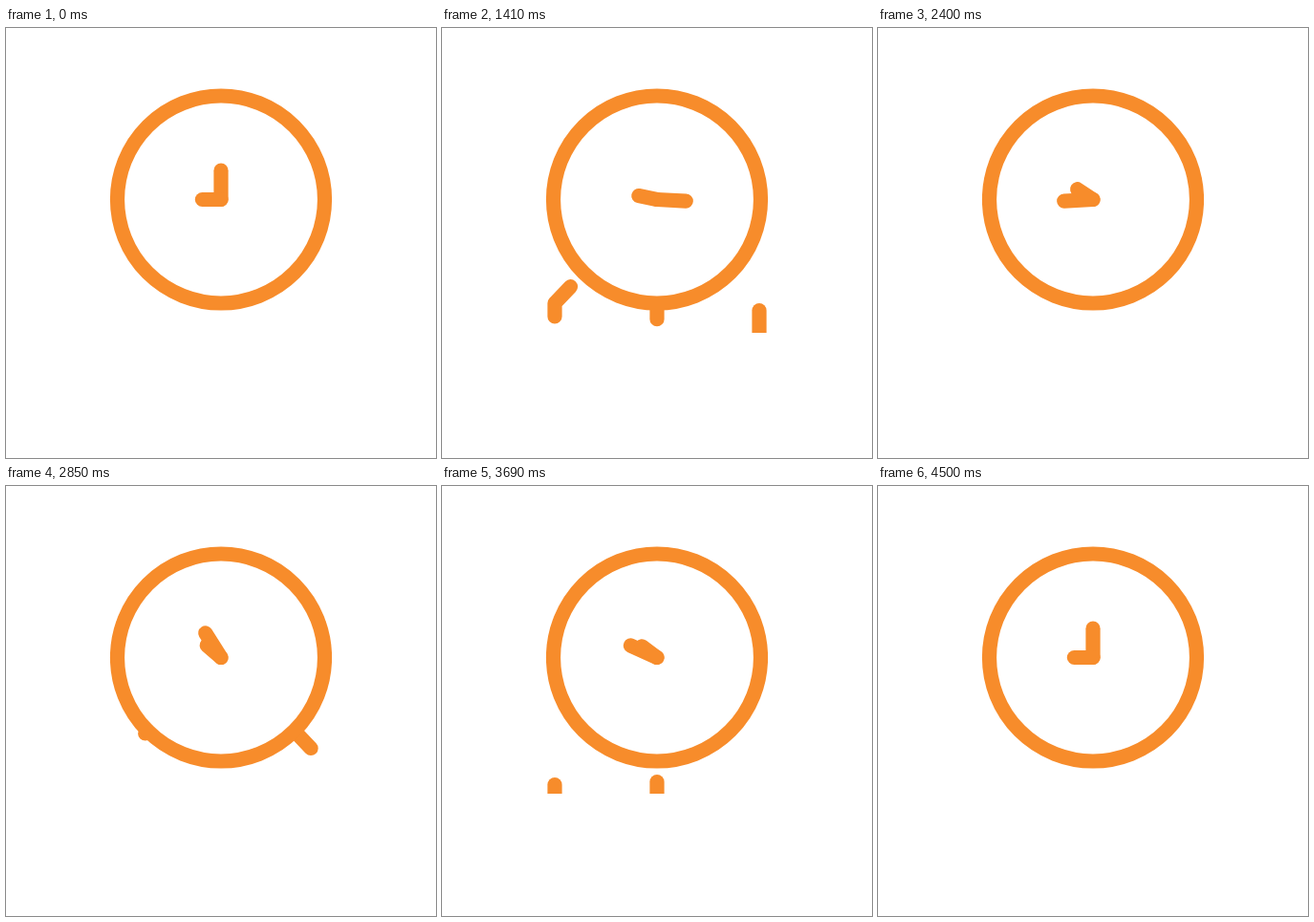
These frames come from a looping animation (450 px wide and 450 px high, 5400 ms). An HTML page:

```html
<!DOCTYPE html>
<html lang="en">
<head>
<meta charset="utf-8">
<title>Clock</title>
<style>
  html, body { margin: 0; width: 100%; height: 100%; overflow: hidden; background: #fff; }
  svg { display: block; width: 100%; height: 100%; }
</style>
</head>
<body>
<svg viewBox="0 0 450 450" fill="none" stroke="#f78c2b" stroke-width="15.2" stroke-linecap="round" stroke-linejoin="round">
  <defs>
    <clipPath id="low"><rect width="450" height="322"/></clipPath>
    <clipPath id="high"><rect width="450" height="319"/></clipPath>
  </defs>
  <g clip-path="url(#high)"><path id="right" d="M301.7 256.2 L332 288 V370"/></g>
  <g clip-path="url(#low)">
    <path id="left" d="M148.3 256.2 L118 288 V370"/>
    <path id="middle" d="M225 290.5 V370"/>
  </g>
  <circle cx="225" cy="179.5" r="108.5"/>
  <path id="minute" d="M225 179.5 V149.2"/>
  <path id="hour" d="M225 179.5 H205.4"/>
</svg>
<script>
  const LOOP = 5400, STEP = 30;
  const REST_FROM = 360, REST_AT = 4500;
  const WAVE = 1920, TRAVEL = 1208, TAIL_LAG = 285;

  const byId = id => document.getElementById(id);
  const minute = byId('minute'), hour = byId('hour');
  const streaks = [
    { path: byId('right'), start: 546, reach: 110 },
    { path: byId('left'), start: 786, reach: 110 },
    { path: byId('middle'), start: 1000, reach: 55 }
  ];

  // Sine ease-in-out between two moments, held at 0 and 1 outside them.
  function ease(time, from, to) {
    const u = Math.min(1, Math.max(0, (time - from) / (to - from)));
    return (1 - Math.cos(Math.PI * u)) / 2;
  }

  function drawStreak({ path, start, reach }, time) {
    const begin = time < start + WAVE ? start : start + WAVE;
    const along = t => reach * ease(t, begin, begin + TRAVEL);
    const head = along(time), tail = along(time - TAIL_LAG);
    const length = head - tail;
    path.style.display = length > 0.01 ? '' : 'none';
    path.setAttribute('stroke-dasharray', `${length} 999`);
    path.setAttribute('stroke-dashoffset', -tail);
  }

  // The hands wind forward slowly, then run back faster.
  function handTurn(time) {
    if (time >= REST_AT) return 0;
    return Math.min(ease(time, REST_FROM, 3450), 1 - ease(time, 3366, 4520));
  }

  function render(now) {
    const time = Math.floor((now % LOOP) / STEP) * STEP;
    const turn = handTurn(time);
    minute.setAttribute('transform', `rotate(${360 * turn} 225 179.5)`);
    hour.setAttribute('transform', `rotate(${45 * turn} 225 179.5)`);
    streaks.forEach(streak => drawStreak(streak, time));
  }

  const origin = performance.now();
  function tick() {
    render(performance.now() - origin);
    requestAnimationFrame(tick);
  }
  tick();
</script>
</body>
</html>
```
